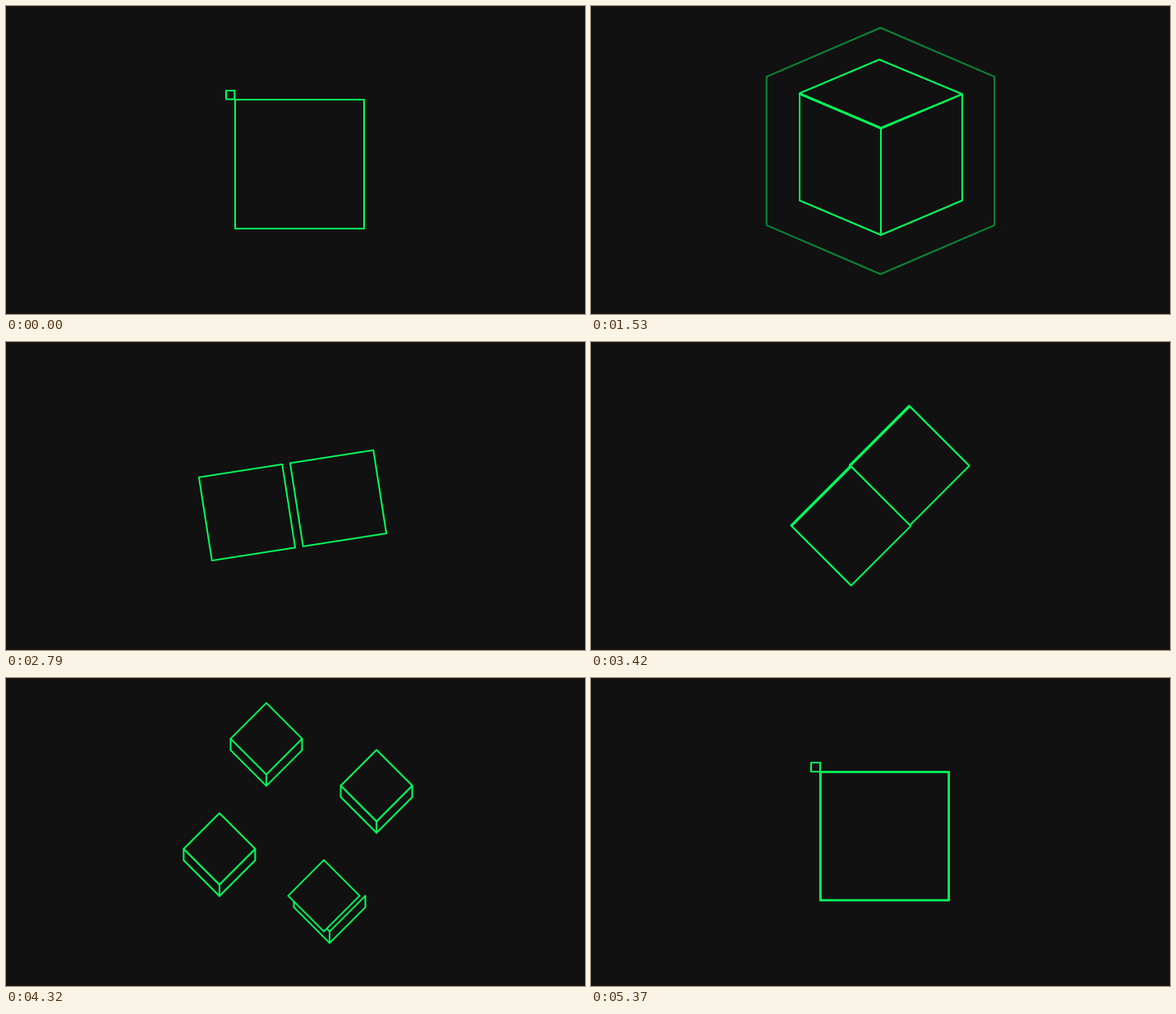
Animation of 705x375 px, one loop 5.4 s. Source, as an HTML page with a canvas:

```html
<!DOCTYPE html>
<html lang="en">
<head>
<meta charset="utf-8">
<title>Square loop</title>
<style>
  html, body { margin: 0; width: 100%; height: 100%; overflow: hidden; background: #111; }
  canvas { display: block; }
</style>
</head>
<body>
<canvas id="stage" width="705" height="375"></canvas>
<script>
const LOOP = 5400;
const CX = 352, CY = 187;
const SMALL = [268, 103, 10.4], BIG = [279, 114, 157];
const g = document.getElementById('stage').getContext('2d');

const mix = (a, b, k) => a + (b - a) * k;
const rad = deg => deg * Math.PI / 180;
const part = (t, a, b) => Math.min(1, Math.max(0, (t - a) / (b - a)));
const ease = (t, a, b) => { const u = part(t, a, b); return u * u * (3 - 2 * u); };
const bump = (t, a, b, power = 1) => Math.sin(Math.PI * part(t, a, b) ** power);

function poly(points, fill = true) {
  g.beginPath();
  points.forEach(([x, y]) => g.lineTo(x, y));
  g.closePath();
  if (fill) g.fill();
  g.stroke();
}

function morph(from, to, u) {
  const [x, y, s] = from.map((v, i) => mix(v, to[i], u));
  poly([[x, y], [x + s, y], [x + s, y + s], [x, y + s]], false);
}

function trade(t) {
  const u = ease(t, 0, 600);
  morph(SMALL, [248.8, 153.8, 65.6], u);
  morph(BIG, [390.2, 154, 66.4], u);
}

// Two faces meet, rise into a cube, flatten, then roll as a pair of squares.
function facePair(t) {
  const join = ease(t, 690, 1130);
  const cube = ease(t, 1120, 1330) - ease(t, 1740, 2060);
  const even = ease(t, 2100, 2600);
  const dip = bump(t, 2300, 3380);
  const lag = 7.5 * bump(t, 2060, 2580);
  const gap = mix(76, 0, join) + 2 * bump(t, 600, 690) + 10 * bump(t, 2000, 3380);
  const roll = -3.5 * ease(t, 2060, 2180) - 41.5 * ease(t, 2620, 3380);
  const w = mix(65.5, 102.6, even) + 33.5 * cube;
  const h = mix(mix(66, 95, join), 102.6, even) + 34.5 * cube;
  const tilt = 42 * cube;
  const top = -h / 2, inner = gap / 2, outer = inner + w;

  g.save();
  g.translate(CX + cube + ease(t, 2060, 2130) * (1 - even) - 3 * dip, CY + 27 * cube + 12 * dip);
  g.rotate(rad(roll));
  const face = (side, height, shear) => {
    const y = height / 2;
    poly([[side * inner, shear - y], [side * outer, -tilt - y],
          [side * outer, y - tilt], [side * inner, y + shear]]);
  };
  face(-1, h, 0);
  face(1, h - lag, lag);
  if (cube > 0.01) {
    poly([[-outer, top - tilt - cube], [-2 * cube, top - 2 * tilt],
          [outer, top - tilt], [0, top - cube]]);
  }
  g.restore();
}

function shockwave(t) {
  const u = part(t, 1320, 1740);
  if (u === 0 || u === 1) return;
  const k = 1 + 0.8 * u;
  const half = [[0, -107], [99, -64.5], [99, 64.5]];
  const ring = half.concat(half.map(([x, y]) => [-x, -y]));
  g.globalAlpha = 1 - u;
  poly(ring.map(([x, y]) => [352.5 + x * k, 176.5 + y * k]), false);
  g.globalAlpha = 1;
}

function tile(x, y, half, spin, depth, shift) {
  const top = [0, 1, 2, 3].map(n => {
    const a = rad(spin + n * 90);
    return [x + half * Math.cos(a), y + half * Math.sin(a)];
  });
  const down = ([px, py]) => [px, py + depth];
  if (depth > 0.3) {
    for (const n of [0, 2]) poly([top[n], down(top[n]), down(top[1]), top[1]]);
  }
  poly(top.map(([px, py]) => [px + shift, py]));
}

// The two squares split into four tiles that swing out, turn and close up.
function orbit(t) {
  const settle = ease(t, 4560, 5040);
  const close = ease(t, 4380, 4570);
  const away = ease(t, 3380, 3960) - settle;
  const cx = CX + 3.5 * away;
  const cy = CY - 8 * away - 9.5 * (ease(t, 3990, 4200) - settle);
  const half = mix(mix(72.5, 43.5, ease(t, 3400, 3960)), 57.5, close) + 1.9 * settle;
  const r = mix(68, 57.5, ease(t, 3990, 4570)) + 53 * bump(t, 3990, 4570, 0.6) + 1.9 * settle;
  const turn = -90 + 90 * ease(t, 4070, 4440) + 45 * settle;
  const depth = 14 * (ease(t, 3400, 3960) - close);
  const shift = -7 * bump(t, 4230, 4410);

  const tiles = [0, 1, 2, 3].map(k => {
    const a = rad(turn + 90 * k);
    const side = k < 2 ? 36.2 : -36.2;
    const split = ease(t, k % 2 ? 3420 : 3360, 3960);
    return {
      x: mix(CX + side, cx + r * Math.cos(a), split),
      y: mix(CY - side, cy + r * Math.sin(a), split),
      shift: k === 1 ? shift : 0
    };
  });
  tiles.sort((a, b) => a.y - b.y);
  tiles.forEach(p => tile(p.x, p.y, half, 45 * settle, depth, p.shift));
}

function merge(t) {
  const u = ease(t, 5040, 5390);
  for (const x of [268, 352]) {
    for (const y of [103, 187]) morph([x, y, 84], x + y === 371 ? SMALL : BIG, u);
  }
}

function draw(t) {
  g.fillStyle = '#111111';
  g.fillRect(0, 0, 705, 375);
  g.strokeStyle = '#00ff5a';
  g.lineWidth = 2;
  g.lineJoin = 'round';
  if (t < 600) trade(t);
  else if (t < 3380) {
    shockwave(t);
    facePair(t);
  } else if (t < 5040) orbit(t);
  else merge(t);
}

function tick() {
  draw(performance.now() % LOOP);
  requestAnimationFrame(tick);
}
draw(0);
requestAnimationFrame(tick);
</script>
</body>
</html>
```
